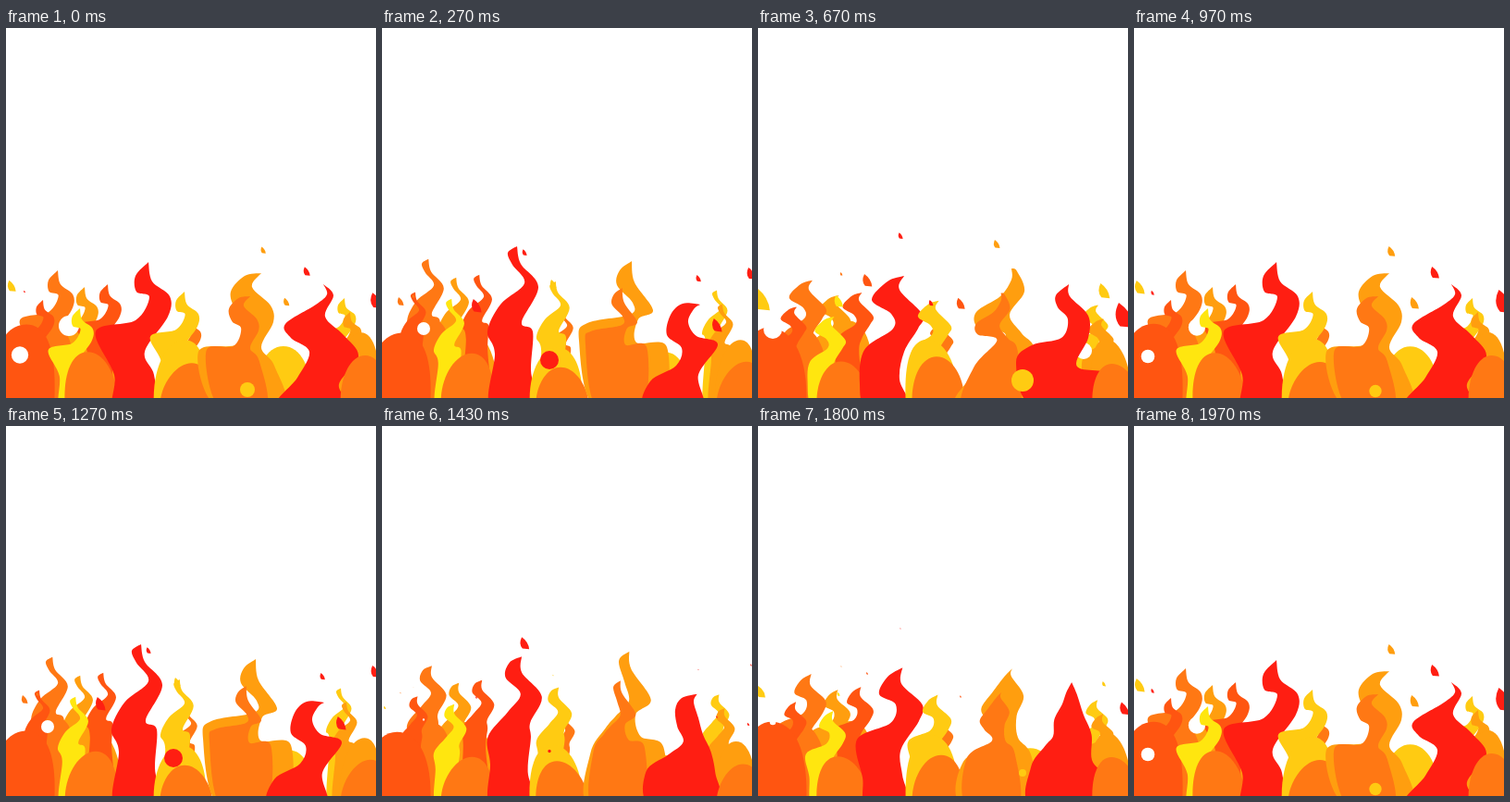
Recreate the animation shown at these times as an HTML page with a canvas. Size 400 by 400 pixels, loop 2010 ms.

```html
<!DOCTYPE html>
<html lang="en">
<head>
<meta charset="utf-8">
<title>Flames</title>
<style>
html, body { margin: 0; width: 100%; height: 100%; overflow: hidden; background: #fff; }
canvas { display: block; width: 400px; height: 400px; }
</style>
</head>
<body>
<canvas id="stage" width="400" height="400"></canvas>
<script>
const LOOP = 2010, CYCLE = 30, FLOOR = 410;
const RED = '#ff1e12', EMBER = '#ff5511', ORANGE = '#ff7814', AMBER = '#ff9e0f',
      GOLD = '#ffcb12', YELLOW = '#ffe60f', WHITE = '#fff';
const ctx = document.getElementById('stage').getContext('2d');

// Outlines run from the tip down the left side and back up the right.
const tall = shape({
  0: '154 253 140 268 141 285 155 291 140 316 97 328 117 375 117 410 160 410 160 375 150 350 175 312 177 290 158 274',
  8: '146 236 136 243 141 256 154 276 128 299 114 328 122 352 117 410 165 410 161 370 163 328 151 318 169 280 150 255',
  20: '158 268 140 274 123 294 144 309 146 325 115 348 110 385 118 410 163 410 153 380 158 350 173 325 178 310 153 283'
});
const curl = shape({
  0: '276 265 258 268 243 285 248 304 262 315 250 342 208 350 228 410 300 410 290 365 276 345 289 318 286 300 266 280',
  8: '270 252 257 262 254 278 271 297 268 310 222 319 213 338 230 410 300 410 308 345 275 340 277 315 293 305 273 275',
  19: '264 234 255 244 272 275 262 298 234 318 265 336 240 373 215 410 300 410 300 350 285 330 271 308 288 285 265 248',
  20: '274 260 274 272 262 290 236 307 238 324 268 333 232 375 215 410 300 410 300 350 285 330 272 310 288 285 280 263'
});
const broad = shape({
  0: '343 277 347 288 335 299 302 320 308 335 328 350 315 378 293 410 366 410 360 385 381 355 365 332 345 312 354 289',
  8: '344 299 325 298 312 310 308 332 324 346 318 365 290 382 285 410 345 410 342 375 363 342 340 333 331 318 337 304',
  20: '336 277 322 289 324 302 335 315 328 335 296 343 279 362 298 410 387 410 386 375 345 366 357 335 357 311 337 290'
});

function shape(poses) {
  const keys = Object.entries(poses).map(([at, s]) => [+at, s.split(' ').map(Number)]);
  const rest = keys[0][1];
  keys.push([CYCLE - 1, rest], [CYCLE, rest]);
  return keys;
}

function pose(keys, step) {
  let i = 0;
  while (keys[i + 1][0] <= step) i++;
  const [a, from] = keys[i], [b, to] = keys[i + 1];
  const k = (step - a) / (b - a), pts = [];
  const at = j => from[j] + (to[j] - from[j]) * k;
  for (let j = 0; j < from.length; j += 2) pts.push([at(j), at(j + 1)]);
  return pts;
}

// Draws a shape with its resting tip at x, y, scaled by s, always rooted on the floor.
function flame(keys, color, x, y, s = 1) {
  const [ox, oy] = keys[0][1];
  return step => {
    const pts = pose(keys, step).map(([px, py]) =>
      [x + (px - ox) * s, py === FLOOR ? FLOOR : y + (py - oy) * s]);
    smooth(color, [...pts, pts[0]]);
  };
}

function smooth(color, p) {
  const end = p.length - 1;
  ctx.fillStyle = color;
  ctx.beginPath();
  ctx.moveTo(...p[0]);
  for (let i = 0; i < end; i++) {
    const o = p[Math.max(i - 1, 0)], a = p[i], b = p[i + 1], n = p[Math.min(i + 2, end)];
    ctx.bezierCurveTo(a[0] + (b[0] - o[0]) / 6, a[1] + (b[1] - o[1]) / 6,
                      b[0] - (n[0] - a[0]) / 6, b[1] - (n[1] - a[1]) / 6, ...b);
  }
  ctx.fill();
}

// A rounded body that sways and bobs once per cycle.
function mound(color, x, top, w) {
  return step => {
    const turn = step / CYCLE * 2 * Math.PI + x;
    const cx = x + 6 * Math.cos(turn), cy = top + 6 * Math.sin(turn);
    ctx.fillStyle = color;
    ctx.beginPath();
    ctx.moveTo(x - w, FLOOR);
    ctx.bezierCurveTo(x - w * 1.1, cy + 30, cx - w * .7, cy, cx, cy);
    ctx.bezierCurveTo(cx + w * .7, cy, x + w * 1.1, cy + 30, x + w, FLOOR);
    ctx.fill();
  };
}

// A bit that swells to size s at its peak step, then shrinks while rising.
function drift(draw, color, peak, x, y, s, life = 6) {
  return step => {
    const d = (step - peak + CYCLE * 1.5) % CYCLE - CYCLE / 2;
    const size = s * (1 - Math.abs(d) / life);
    if (size > 0) draw(color, x, y - d * 1.5, size);
  };
}
const spark = (...a) => drift(leaf, ...a);
const hole = (...a) => drift(disc, WHITE, ...a);

function leaf(color, x, y, s) {
  ctx.fillStyle = color;
  ctx.beginPath();
  ctx.moveTo(x - s * .4, y - s);
  ctx.quadraticCurveTo(x + s * .6, y - s * .3, x + s * .7, y + s * .8);
  ctx.lineTo(x - s * .3, y + s * .7);
  ctx.quadraticCurveTo(x - s * .9, y, x - s * .4, y - s);
  ctx.fill();
}

function disc(color, x, y, r) {
  ctx.fillStyle = color;
  ctx.beginPath();
  ctx.arc(x, y, r, 0, 7);
  ctx.fill();
}

const left = [
  flame(tall, AMBER, 85, 280, .6),
  mound(AMBER, 95, 322, 30),
  flame(tall, ORANGE, 56, 262, .72),
  mound(ORANGE, 48, 318, 28),
  flame(tall, EMBER, 110, 277, .6),
  flame(tall, EMBER, 40, 294, .5),
  mound(EMBER, 18, 325, 34),
  hole(0, 68, 322, 11),
  hole(8, 45, 325, 7),
  hole(1, 15, 352, 11),
  hole(20, 16, 326, 10),
  flame(tall, YELLOW, 80, 303, .6),
  mound(ORANGE, 92, 355, 28)
];

const middle = [
  flame(tall, RED, 154, 253),
  flame(tall, ORANGE, 200, 312, .45),
  flame(tall, GOLD, 193, 285, .65),
  mound(GOLD, 188, 340, 28),
  drift(disc, RED, 8, 181, 359, 10),
  mound(ORANGE, 195, 361, 28),
  mound(GOLD, 300, 350, 30),
  flame(curl, AMBER, 276, 265),
  flame(curl, ORANGE, 264, 290, .7)
];

const right = [
  flame(tall, GOLD, 366, 292, .5),
  flame(tall, AMBER, 372, 307, .5),
  mound(AMBER, 382, 335, 22),
  hole(20, 352, 349, 9),
  flame(broad, RED, 343, 277),
  mound(ORANGE, 388, 360, 26),
  drift(disc, GOLD, 20, 286, 381, 12),
  drift(disc, GOLD, 0, 261, 391, 8)
];

const redSparks = [
  spark(RED, 14, 154, 234, 8, 11),
  spark(RED, 29, 325, 265, 7, 4),
  spark(RED, 8, 342, 271, 4),
  spark(RED, 28, 20, 288, 4, 3),
  spark(RED, 29, 400, 297, 14, 3),
  spark(RED, 20, 396, 312, 15, 8),
  spark(RED, 8, 399, 266, 7),
  spark(RED, 8, 362, 322, 8),
  spark(RED, 8, 102, 301, 8),
  spark(RED, 19, 187, 299, 7, 2),
  spark(EMBER, 19, 118, 275, 9),
  spark(EMBER, 19, 219, 300, 8)
];

const goldSparks = [
  spark(AMBER, 20, 258, 234, 5, 1),
  spark(AMBER, 29, 278, 242, 6, 3),
  spark(AMBER, 29, 303, 298, 7, 3),
  spark(ORANGE, 8, 20, 296, 5),
  spark(ORANGE, 8, 34, 290, 2),
  spark(ORANGE, 20, 90, 266, 2),
  spark(GOLD, 29, 6, 281, 8),
  spark(GOLD, 20, 3, 294, 14, 8),
  spark(GOLD, 8, 185, 277, 5),
  spark(GOLD, 20, 374, 285, 9),
  spark(YELLOW, 20, 87, 296, 7)
];

const groups = [left, middle, right, redSparks, goldSparks];

function render(now) {
  const t = now % LOOP;
  const step = Math.min(Math.floor((t + 5) * .03), 2 * CYCLE - 1) % CYCLE;
  ctx.fillStyle = WHITE;
  ctx.fillRect(0, 0, 400, 400);
  for (const group of groups) for (const draw of group) draw(step);
}

const start = performance.now();
function tick() {
  render(performance.now() - start);
  requestAnimationFrame(tick);
}
tick();
</script>
</body>
</html>
```
